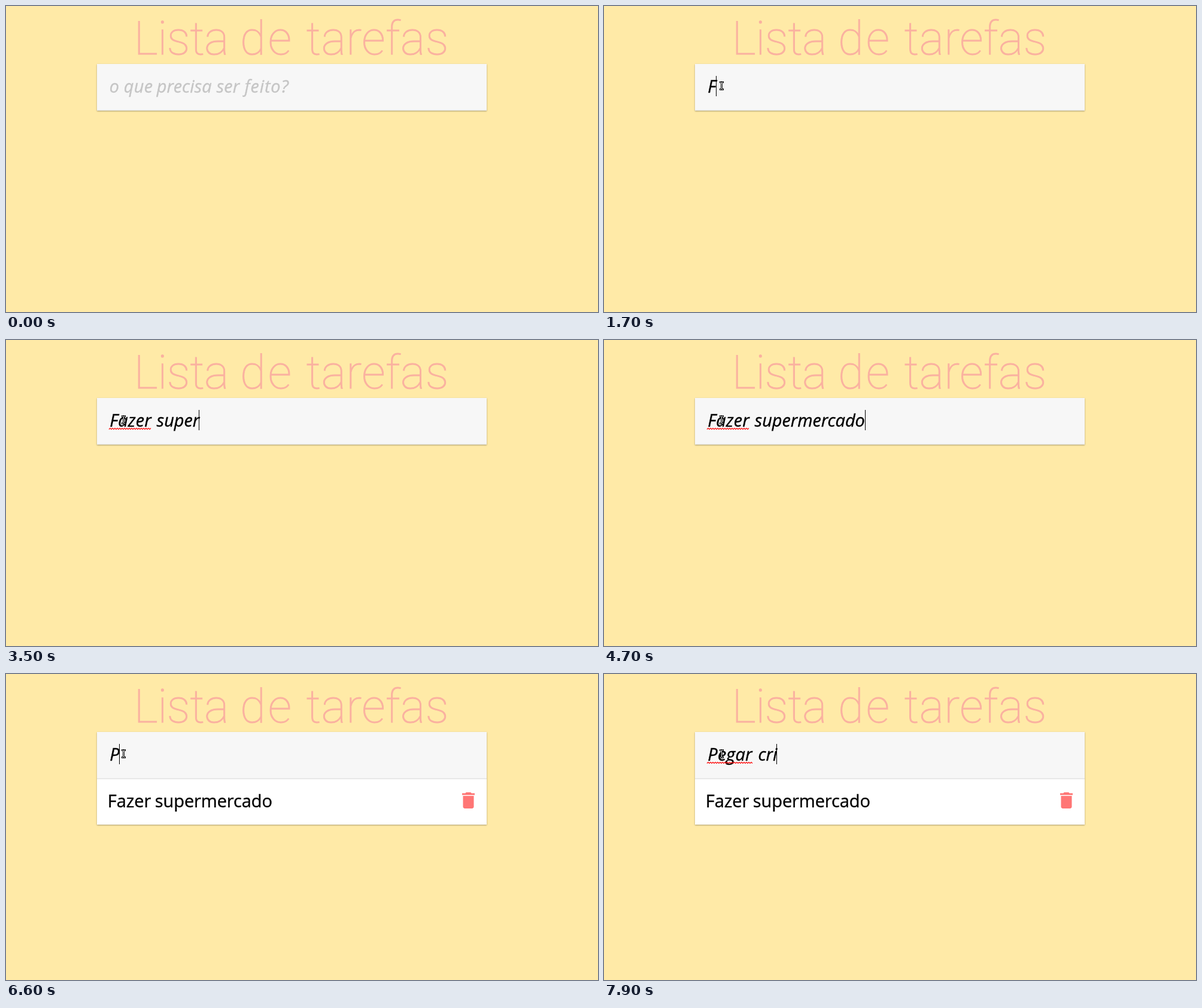
Write an HTML page that moves like this. It is 989 px wide and 512 px high and loops after 8 s.

```html
<!DOCTYPE html>
<html lang="pt-BR">
<head>
<meta charset="utf-8">
<title>Lista de tarefas</title>
<style>
html, body { margin: 0; width: 100%; height: 100%; overflow: hidden; background: #ffeaa7; }
.card, .item, svg { position: absolute; }
.card {
  left: 152px; top: 97px; width: 651px; height: 78px; background: #f7f7f7;
  box-shadow: 0 1px 3px rgba(0,0,0,.12), 0 1px 2px rgba(0,0,0,.24), inset 0 -2px 1px rgba(0,0,0,.03);
}
.card.open { height: 155px; }
.item {
  left: 0; top: 78px; width: 100%; height: 77px; box-sizing: border-box;
  background: #fff; border-top: 1px solid #e4e4e4; display: none;
  box-shadow: 0 -1px 1px rgba(0,0,0,.04);
}
.open .item { display: block; }
svg { left: 0; top: 0; }
text { font: 29px "Open Sans", "Noto Sans", sans-serif; stroke: #000; stroke-width: .35; }
.title { font: 100 78px Roboto, Lato, sans-serif; fill: #fab1a0; stroke: #fab1a0; stroke-width: .9; }
.entry { font-style: italic; }
.hint { fill: #c5c5c5; stroke: #c5c5c5; }
</style>
</head>
<body>
<div class="card" id="card"><div class="item"></div></div>
<svg width="989" height="512" viewBox="0 0 989 512">
  <text class="title" id="title" y="81"></text>
  <text class="entry hint" id="hint" y="145"></text>
  <text class="entry" id="entry" y="145"></text>
  <path id="squiggle" fill="none" stroke="#f00" stroke-width="1.1"/>
  <g id="task">
    <text id="label" y="223"></text>
    <path transform="translate(754.5 193.5) scale(1.5)" fill="#ff7675"
      d="M6 19c0 1.1.9 2 2 2h8c1.1 0 2-.9 2-2V7H6zM19 4h-3.5l-1-1h-5l-1 1H5v2h14z"/>
  </g>
  <rect id="caret" width="1" height="34"/>
  <path id="arrow" d="M0 0v16l3.7-3.5 2.4 5.6 2.5-1.1-2.4-5.4h5z" stroke="#fff"/>
  <g id="beam" fill="none" stroke-linecap="square">
    <path id="beamEdge" stroke="#000" stroke-width="3"/>
    <path id="beamCore" stroke="#fff"/>
  </g>
</svg>
<script>
const $ = id => document.getElementById(id);
const LOOP = 8000, STEP = 100, LEFT = 172;

// Each word: start x, text, letter spacing
function setWords(el, words) {
  el.replaceChildren(...words.map(([x, word, gap = 0]) => {
    const span = document.createElementNS('http://www.w3.org/2000/svg', 'tspan');
    span.setAttribute('x', x);
    span.setAttribute('letter-spacing', gap);
    span.textContent = word;
    return span;
  }));
}

// Each key: time, character, caret x after it
const entries = [
  { end: 5000, wordX: [173.3, 251.8], gap: [.2, -.05], lineEnd: 243, keys: [
    [1700, 'F', 187], [1900, 'a', 203], [2100, 'z', 218], [2400, 'e', 233], [2600, 'r', 244],
    [2700, ' ', 250], [2900, 's', 263], [3000, 'u', 280], [3300, 'p', 296], [3400, 'e', 311],
    [3500, 'r', 322], [3800, 'm', 348], [3900, 'e', 363], [4100, 'r', 375], [4300, 'c', 388],
    [4400, 'a', 403], [4600, 'd', 420], [4700, 'o', 436]] },
  { end: LOOP, wordX: [173.3, 257.5], gap: [.3, 0], lineEnd: 249, keys: [
    [6600, 'P', 189], [6700, 'e', 205], [7100, 'g', 222], [7200, 'a', 238], [7400, 'r', 249],
    [7500, ' ', 256], [7600, 'c', 269], [7800, 'r', 281], [7900, 'i', 288]] }
];

const blinkOff = [[0, 800], [1400, 1700], [5300, 5900], [6500, 6600]];

const zigzag = end => {
  let d = `M${LEFT} 149.5`;
  for (let x = LEFT + 2, up = true; x <= end; x += 2, up = !up) d += `L${x} ${up ? 147.5 : 149.5}`;
  return d;
};

const show = (el, on) => { el.style.display = on ? '' : 'none'; };

function drawPointer(t) {
  const p = Math.min(1, Math.max(0, (t - 300) / 400));
  const ease = 1 - (1 - p) ** 1.7;
  const x = 39 + 157 * ease, y = 57 + 76 * ease;
  const overInput = x > 152 && y > 97;
  show($('arrow'), t >= 300 && !overInput);
  show($('beam'), t >= 300 && overInput);
  for (const id of ['arrow', 'beam']) $(id).setAttribute('transform', `translate(${Math.round(x)} ${Math.round(y)})`);
}

function draw(time) {
  const t = Math.floor(time % LOOP / STEP) * STEP;
  const entry = entries.find(e => t < e.end);
  const typed = entry.keys.filter(k => k[0] <= t);
  const text = typed.map(k => k[1]).join('');
  const added = t >= 5000;

  $('card').classList.toggle('open', added);
  show($('task'), added);
  show($('hint'), !text);
  setWords($('entry'), text.split(' ').map((w, i) => [entry.wordX[i], w, entry.gap[i]]));
  $('squiggle').setAttribute('d', text.includes(' ') ? zigzag(entry.lineEnd) : '');

  $('caret').setAttribute('x', text ? typed[typed.length - 1][2] : LEFT);
  $('caret').setAttribute('y', text ? 117 : 118);
  show($('caret'), !blinkOff.some(([from, to]) => t >= from && t < to));
  drawPointer(t);
}

setWords($('title'), [[213.5, 'Lista', -.5], [391, 'de', 4], [501.5, 'tarefas', .5]]);
setWords($('hint'), [[172.7, 'o'], [196.7, 'que', .3], [251.7, 'precisa', .15], [351.7, 'ser', .2], [398.5, 'feito?', .9]]);
setWords($('label'), [[169.7, 'Fazer'], [248.8, 'supermercado', -.1]]);

const beamShape = 'M-1.5 -5.5h1l1 1l1-1h1M.5-4.5v10M-1.5 6.5h1l1-1l1 1h1';
for (const id of ['beamEdge', 'beamCore']) $(id).setAttribute('d', beamShape);

const start = performance.now();
function tick() {
  draw(performance.now() - start);
  requestAnimationFrame(tick);
}
tick();
</script>
</body>
</html>
```
